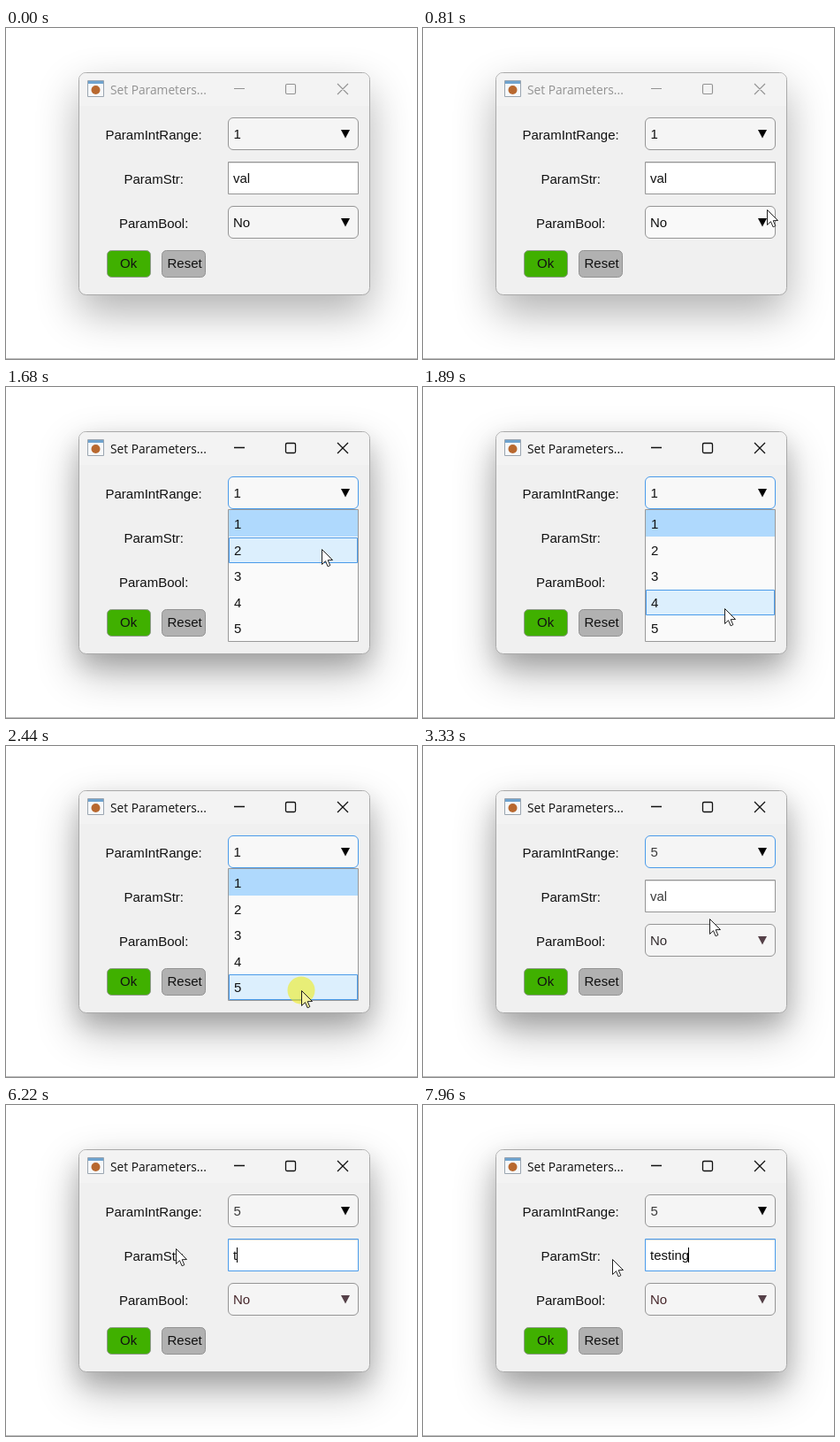
An HTML page with a canvas that plays this animation: 465x374 px, repeating every 8 s.

```html
<!DOCTYPE html>
<html lang="en">
<head>
<meta charset="utf-8">
<title>Set Parameters</title>
<style>
html, body { margin: 0; width: 100%; height: 100%; overflow: hidden; background: #fff; }
canvas { display: block; width: 465px; height: 374px; }
</style>
</head>
<body>
<canvas id="stage" width="465" height="374"></canvas>
<script>
const ctx = document.getElementById('stage').getContext('2d');
const W = 465, H = 374, LOOP = 8000;
const UI = '15px "Liberation Sans", Arial, sans-serif';
const TITLE = '13.75px "Open Sans", "Noto Sans", sans-serif';
const BLUE = '#4a9bea', GREY = '#959595';
const FIELD_X = 251, FIELD_W = 148, TEXT_X = 257;
const LIST_Y = 138, ROW = 29.6;

// Event times in ms
const OPEN = 1210, PICK = 2640, EDIT = 3670, DRAG = 3740, BLINK = [7430, 7890];
const PRESSES = [[OPEN, 1280], [2440, 2580], [3670, 4190]];
const KEYS = [6220, 6290, 6490, 6560, 6760, 6830, 6900];
const WORD = 'testing';

// Pointer path: time, x, y
const PATH = [
  [390, 398, 360], [700, 393, 250], [900, 384, 160], [1010, 377, 115], [1080, 369, 122],
  [1490, 369, 122], [1620, 362, 160], [1890, 341, 250], [2100, 331, 287],
  [2260, 331, 287], [2440, 334, 276], [2770, 335, 277],
  [2900, 335, 277], [3326, 324, 195], [3470, 290, 174],
  [DRAG, 290, 174], [4080, 192, 162],
  [7840, 192, 162], [7960, 214, 174]
];

// The pointer is sampled on a fixed step
function pointerAt(t) {
  if (t < PATH[0][0]) return null;
  const step = 68.3, q = 390 + Math.floor((t - 370) / step) * step;
  let i = 1;
  while (i < PATH.length - 1 && PATH[i][0] < q) i++;
  const a = PATH[i - 1], b = PATH[i];
  const k = Math.min(1, Math.max(0, (q - a[0]) / (b[0] - a[0])));
  return { x: Math.round(a[1] + (b[1] - a[1]) * k), y: Math.round(a[2] + (b[2] - a[2]) * k) };
}

function text(str, x, y, color = '#111', font = UI) {
  ctx.font = font;
  ctx.fillStyle = color;
  ctx.fillText(str, x, y);
}

function box(x, y, w, h, r, fill, stroke) {
  ctx.beginPath();
  ctx.roundRect(x + .5, y + .5, w - 1, h - 1, r);
  ctx.fillStyle = fill;
  ctx.fill();
  if (stroke) {
    ctx.strokeStyle = stroke;
    ctx.lineWidth = 1;
    ctx.stroke();
  }
}

function rect(x, y, w, h, fill) {
  ctx.fillStyle = fill;
  ctx.fillRect(x, y, w, h);
}

function shape(points, fill, stroke) {
  ctx.beginPath();
  points.forEach(([x, y]) => ctx.lineTo(x, y));
  ctx.closePath();
  ctx.fillStyle = fill;
  ctx.fill();
  if (stroke) {
    ctx.strokeStyle = stroke;
    ctx.lineWidth = 1;
    ctx.stroke();
  }
}

function shadow(alpha, offset, blur) {
  ctx.save();
  ctx.shadowColor = `rgba(0,0,0,${alpha})`;
  ctx.shadowOffsetY = offset;
  ctx.shadowBlur = blur;
  box(82, 50, 330, 252, 8, '#f0f0f0');
  ctx.restore();
}

function drawWindow(active) {
  shadow(.31, 20, 48);
  if (active) shadow(.14, 12, 26);
  box(82, 50, 330, 252, 8, '#f0f0f0', '#a9a9a9');
  ctx.beginPath();
  ctx.roundRect(83, 51, 328, 37, [7, 7, 0, 0]);
  ctx.fillStyle = '#f3f3f3';
  ctx.fill();

  box(92, 59, 19, 19, 0, '#f6f8fa', '#9aa5b0');
  rect(93, 60, 17, 3, '#6fa3cf');
  ctx.beginPath();
  ctx.arc(101.5, 70, 5, 0, 7);
  ctx.fillStyle = '#b8682f';
  ctx.fill();

  const ink = active ? '#111' : '#929292';
  text('Set Parameters...', 118, 75, ink, TITLE);
  ctx.strokeStyle = ink;
  ctx.lineWidth = active ? 1.3 : 1.1;
  ctx.beginPath();
  ctx.moveTo(258, 68.5); ctx.lineTo(270, 68.5);
  ctx.roundRect(316.5, 63.5, 11, 11, 1.5);
  ctx.moveTo(375, 63); ctx.lineTo(387, 75);
  ctx.moveTo(387, 63); ctx.lineTo(375, 75);
  ctx.stroke();
}

function drawCombo(y, value, o) {
  box(FIELD_X, y, FIELD_W, 37, 5.5, o.fill, o.focus ? BLUE : GREY);
  text(value, TEXT_X + (value === 'No' ? 0 : .5), y + 24, o.ink);
  shape([[379, y + 14], [389, y + 14], [384, y + 23.5]], o.arrow);
}

function drawEdit(t) {
  const focus = t >= EDIT;
  box(FIELD_X, 151, FIELD_W, 37, 0, '#fff', focus ? BLUE : GREY);
  rect(FIELD_X + 1, 152, FIELD_W - 2, 1, '#dcdcdc');
  const typed = KEYS.filter(k => t >= k).length;
  const value = typed ? WORD.slice(0, typed) : 'val';
  ctx.font = UI;
  if (!typed && t >= DRAG) {
    const px = pointerAt(t).x, end = TEXT_X + ctx.measureText('val').width;
    const cut = ['', 'v', 'va', 'val'].map(s => TEXT_X + ctx.measureText(s).width)
      .find((x, i, all) => i === 3 || px < (x + all[i + 1]) / 2);
    rect(cut, 161, end - cut, 17, '#b3d8fb');
  }
  text(value, TEXT_X, 175, !typed && t >= PICK ? '#3c3c3c' : '#111');
  if (typed && !(t >= BLINK[0] && t < BLINK[1])) {
    rect(Math.floor(TEXT_X + ctx.measureText(value).width) - (typed === 7 ? 1 : 0), 161, 1, 17, '#000');
  }
}

function drawList(p) {
  box(FIELD_X, LIST_Y, FIELD_W, 150, 0, '#fafafa', '#999');
  const hover = p.y > LIST_Y ? Math.min(4, Math.floor((p.y - LIST_Y - 1) / ROW)) : -1;
  for (let i = 0; i < 5; i++) {
    const y = Math.round(LIST_Y + 1 + i * ROW);
    if (i === 0) rect(FIELD_X + 1, y, FIELD_W - 2, 30, '#afd9fd');
    else if (i === hover) box(FIELD_X + 1, y + 1, FIELD_W - 2, 29, 0, '#dceffd', BLUE);
    text(String(i + 1), 258, Math.round(160 + i * 29.5));
  }
}

function drawPointer(p, pressed) {
  const outline = [[0, 0], [0, 17], [4, 13.2], [6.6, 19.3], [9.3, 18.1], [6.7, 12.2], [12, 12]];
  shape(outline.map(([x, y]) => [p.x + x + .5, p.y + y + .5]), pressed ? '#f6f3a0' : '#fff', '#222');
}

function draw(t) {
  const active = t >= OPEN, open = active && t < PICK, picked = t >= PICK;
  const p = pointerAt(t);
  const pressed = PRESSES.some(([a, b]) => t >= a && t < b);
  const over = y => p && p.x >= FIELD_X && p.y >= y && p.y < y + 37;

  rect(0, 0, W, H, '#fff');
  drawWindow(active);
  rect(0, 373, W, 1, '#bcbcbc');

  text('ParamIntRange:', 112.5, 126);
  text('ParamStr:', 133.5, 176);
  text('ParamBool:', 128, 226);

  drawCombo(101, picked ? '5' : '1', {
    fill: open ? (over(101) ? '#b8b8b8' : '#f8f8f8') : '#f5f5f5',
    focus: active && t < EDIT,
    ink: picked ? '#3c3c3c' : '#111',
    arrow: '#000'
  });
  drawEdit(t);
  drawCombo(201, 'No', {
    fill: over(201) ? '#f9f9f9' : '#f5f5f5',
    focus: false,
    ink: t >= EDIT ? '#47282c' : picked ? '#332c2e' : '#111',
    arrow: picked ? '#554048' : '#000'
  });

  box(114, 251, 50, 31, 5, '#40b000', '#8f9a8a');
  text('Ok', 129, 271);
  box(176, 251, 50, 31, 5, '#b1b1b1', '#929292');
  text('Reset', 182.5, 271);

  if (open) drawList(p);
  if (!p) return;
  if (pressed) {
    ctx.beginPath();
    ctx.arc(p.x, p.y, 15.5, 0, 7);
    ctx.fillStyle = 'rgba(240,236,30,.6)';
    ctx.fill();
  }
  drawPointer(p, pressed);
}

const start = performance.now();
function tick() {
  draw((performance.now() - start) % LOOP);
  requestAnimationFrame(tick);
}
tick();
</script>
</body>
</html>
```
